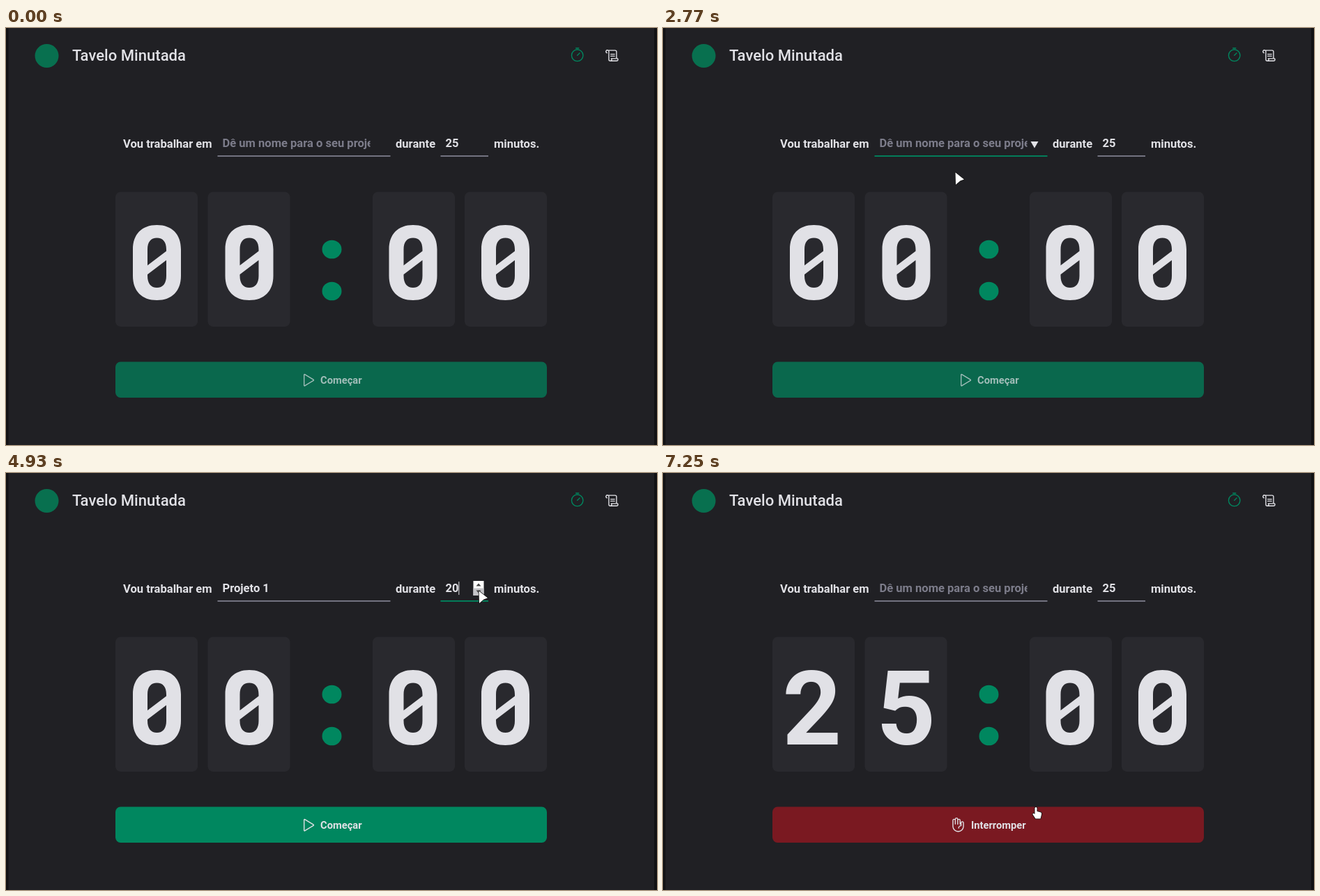
These frames come from a looping animation (934 by 599 pixels, 8 s). An HTML page:

```html
<!DOCTYPE html>
<html lang="pt-BR">
<head>
<meta charset="utf-8">
<title>Timer</title>
<style>
  html, body { margin: 0; width: 100%; height: 100%; overflow: hidden; background: #202024; }
  svg { display: block; width: 100%; height: 100%; }
  text { font: 700 16.56px Roboto, sans-serif; fill: #e1e1e6; white-space: pre; }
  .title { font-size: 22.08px; font-weight: 500; }
  .label { font-size: 14.72px; }
  .digit { font-size: 148px; text-anchor: middle; }
  .icon { fill: none; stroke-linecap: round; stroke-linejoin: round; stroke-width: 16; stroke: #e1e1e6; }
  .hint { fill: #7c7c8a; }
  .pointer { fill: #fff; stroke: #111; stroke-width: 1.6; stroke-linejoin: round; paint-order: stroke; }
</style>
</head>
<body>
<svg viewBox="0 0 934 599">
  <defs>
    <clipPath id="inputClip"><rect x="304" y="150" width="218.5" height="32"/></clipPath>
    <path id="zero" fill="#e1e1e6" fill-rule="evenodd" d="M0 35C0 13 13 0 34.5 0S69 13 69 35V73C69 95 56 108 34.5 108S0 95 0 73Z
      M21 58V35C21 24 26 18.500 34.500 18.500S48 24 48 35V37.500Z
      M48 50.500V73C48 84 43 90 34.500 90S21 84 21 73V71Z"/>
  </defs>
  <rect width="934" height="599" fill="#202024"/>
  <rect width="3.500" height="599" fill="#121214"/>
  <rect x="930" width="4" height="599" fill="#121214"/>

  <circle cx="58.500" cy="40" r="17" fill="#08704f"/>
  <text class="title" x="95" y="46.500">Tavelo Minutada</text>
  <g class="icon" transform="translate(808.700 28.300) scale(.086)" style="stroke:#00875f">
    <circle cx="128" cy="128" r="96"/><path d="M128 128L168 88M104 8h48"/>
  </g>
  <g class="icon" transform="translate(858.700 28.700) scale(.086)">
    <path d="M104 104h64M104 136h64M40 82A24 24 0 1 1 72 64V192a24 24 0 0 0 48 0c0-10-8-16-8-16H216s8 6 8 16a24 24 0 0 1-24 24H96M48 40H176a24 24 0 0 1 24 24V176"/>
  </g>

  <text x="168" y="172">Vou trabalhar em</text>
  <text x="559" y="172">durante</text>
  <text x="700" y="172">minutos.</text>
  <rect id="projectLine" x="303.500" y="183" width="248" height="1.800"/>
  <rect id="minutesLine" x="623.500" y="183" width="68.500" height="1.800"/>
  <text id="hint" class="hint" x="310.500" y="171" clip-path="url(#inputClip)">Dê um nome para o seu projeto</text>
  <text id="project" x="310.500" y="171">Projeto 1</text>
  <path id="squiggle" fill="none" stroke="#e81010" stroke-width="1.200"/>
  <path id="dropArrow" d="M527.500 163h11l-5.500 9.500Z" fill="#e1e1e6"/>
  <text id="minutes" x="630.500" y="171"></text>
  <g id="spinner">
    <rect x="670.500" y="155" width="15" height="21" fill="#fff"/>
    <rect id="spinnerHover" x="670.500" width="15" height="10.500" fill="#c4c4c8"/>
    <path d="M674.500 162.500l3.500-4 3.500 4ZM674.500 168.500l3.500 4 3.500-4Z" fill="#444"/>
  </g>
  <rect id="caret" y="156" width="1" height="19" fill="#e1e1e6"/>

  <g id="cards"></g>
  <g id="zeroMinutes"><use href="#zero" x="182" y="283"/><use href="#zero" x="314.500" y="283"/></g>
  <g id="setMinutes">
    <text class="digit" x="213.700" y="389.500">2</text><text class="digit" x="348.700" y="389.500">5</text>
  </g>
  <use href="#zero" x="549.500" y="283"/><use href="#zero" x="682" y="283"/>
  <g fill="#00875f"><ellipse cx="467.500" cy="318" rx="14" ry="13.300"/><ellipse cx="467.500" cy="378" rx="14" ry="13.300"/></g>

  <rect id="focusRing" x="156" y="478.700" width="621" height="53.300" rx="8" fill="none" stroke="#00875f" stroke-width="2"/>
  <rect id="button" x="157" y="479.500" width="619" height="51.500" rx="7.400"/>
  <g id="start">
    <path class="icon" transform="translate(421.500 494.700) scale(.086)" d="M228 121L84 33A8 8 0 0 0 72 40V216a8 8 0 0 0 12 7L228 135a8 8 0 0 0 0-14Z"/>
    <text class="label" x="451" y="511">Começar</text>
  </g>
  <g id="stop">
    <path class="icon" transform="translate(412.500 494.300) scale(.086)" d="M120 120V36a20 20 0 0 0-40 0M160 120V56a20 20 0 0 0-40 0M80 116V56a20 20 0 0 0-40 0v96a88 88 0 0 0 176 0V96a20 20 0 0 0-40 0v48a40 40 0 0 0-40 40"/>
    <text class="label" x="442" y="511">Interromper</text>
  </g>

  <circle id="press" r="11" fill="#c8c000" fill-opacity=".7"/>
  <g id="cursor">
    <path id="arrow" class="pointer" d="M.5 .5L13 10.500 7.500 12.500 1 18Z"/>
    <path id="beam" d="M-3-8h2l1 1 1-1h2M0-7V7M-3 8h2l1-1 1 1h2" fill="none" stroke="#e1e1e6"/>
    <path id="hand" class="pointer" d="M-1.500 1Q0-1 1.500 1V6L7 7.500Q8.500 8 8 10.500L6.500 16.500H-.5L-4.500 10.500Q-4.500 8-1.500 10Z"/>
  </g>
</svg>
<script>
const LOOP = 8000;
const $ = id => document.getElementById(id);
const show = (id, on) => $(id).setAttribute("visibility", on ? "visible" : "hidden");
const fill = (id, color) => $(id).setAttribute("fill", color);
const between = (t, a, b) => t >= a && t < b;

// Pointer stops: time, x, y
const stops = [
  [130, 836, 596], [920, 276, 218], [950, 282, 214], [1050, 303, 195],
  [1350, 392, 168], [1600, 400, 162], [1890, 400, 162], [2200, 414, 210],
  [2450, 419, 207], [3070, 419, 207], [3610, 620, 188], [3860, 675, 158],
  [4100, 675, 158], [4420, 678, 169], [5270, 678, 169], [5550, 675, 157],
  [6400, 675, 157], [7050, 535, 480]
];
const presses = [1630, 3880, 4520, 4830, 5160, 5710, 6060, 7090];
const minuteSteps = [[3880, 30], [4520, 25], [4830, 20], [5160, 15], [5710, 20], [6060, 25]];

$("cards").innerHTML = [157, 289.5, 526, 658].map(x =>
  `<rect x="${x}" y="235.5" width="118" height="193.5" rx="7.4" fill="#29292e"/>`).join("");
$("squiggle").setAttribute("d", "M" + Array.from({ length: 54 }, (_, i) =>
  `${311 + i} ${(173.5 + 1.3 * Math.sin(i * Math.PI / 2.2)).toFixed(2)}`).join("L"));

function pointerAt(t) {
  const next = stops.findIndex(s => s[0] > t);
  if (next < 0) return stops[stops.length - 1].slice(1);
  if (next === 0) return stops[0].slice(1);
  const [t0, x0, y0] = stops[next - 1], [t1, x1, y1] = stops[next];
  const u = (t - t0) / (t1 - t0), k = u * u * (3 - 2 * u);
  return [x0 + (x1 - x0) * k, y0 + (y1 - y0) * k];
}

function render(t) {
  const [x, y] = pointerAt(t);
  const running = t >= 7210;
  const named = between(t, 2790, 7210);
  const projectFocus = between(t, 1630, 3880);
  const minutesFocus = between(t, 3880, 7090);
  const inRow = y > 152 && y < 184;
  const overProject = inRow && x > 304 && x < 551;
  const overMinutes = inRow && x > 623 && x < 692;
  const overSpinner = overMinutes && x > 669;
  const overButton = t >= 7020;

  fill("projectLine", projectFocus ? "#00875f" : "#7c7c8a");
  fill("minutesLine", minutesFocus ? "#00875f" : "#7c7c8a");
  show("hint", !named);
  show("project", named);
  show("squiggle", between(t, 2890, 3880));
  show("dropArrow", overProject || projectFocus);
  show("spinner", overMinutes || minutesFocus);
  show("spinnerHover", overSpinner);
  $("spinnerHover").setAttribute("y", y < 165 ? 155 : 165.5);
  $("minutes").textContent = minuteSteps.reduce((value, [at, next]) => t >= at ? next : value, 25);

  const projectCaret = between(t, 1630, 2190) || between(t, 2790, 3290) || between(t, 3790, 3880);
  show("caret", projectCaret || minutesFocus);
  $("caret").setAttribute("x", minutesFocus ? 649.3 : named ? 378 : 310);

  show("zeroMinutes", !running);
  show("setMinutes", running);
  show("start", !running);
  show("stop", running);
  show("focusRing", between(t, 7090, 7230));
  fill("button", running ? "#7a1921" : !named ? "#0a684d" : overButton ? "#015f43" : "#00875f");
  $("start").setAttribute("opacity", named ? 1 : .7);

  show("press", presses.some(p => between(t, p, p + 100)));
  $("press").setAttribute("transform", `translate(${x} ${y})`);
  $("cursor").setAttribute("transform", `translate(${x} ${y})`);
  const visible = t >= 130;
  const beam = overProject || overMinutes && !overSpinner;
  show("arrow", visible && !beam && !overButton);
  show("beam", visible && beam);
  show("hand", overButton);
}

function tick() {
  render(performance.now() % LOOP);
  requestAnimationFrame(tick);
}
tick();
</script>
</body>
</html>
```
